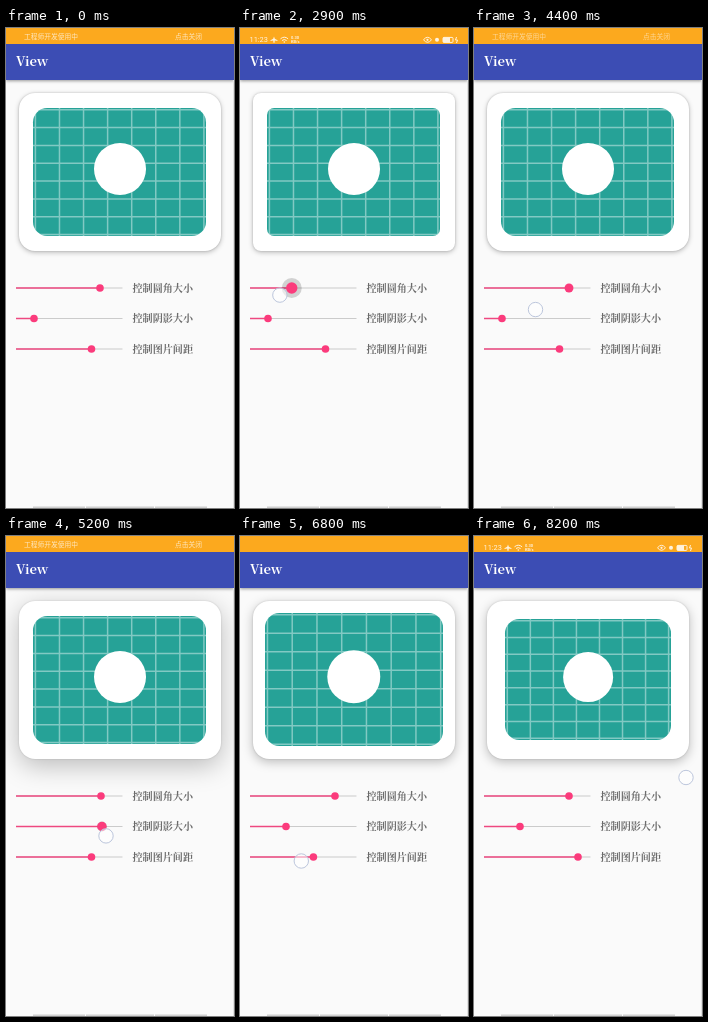
An HTML page that plays this animation: 228 by 480 pixels, repeating every 8.3 s.

```html
<!DOCTYPE html>
<html lang="zh">
<head>
<meta charset="utf-8">
<title>View</title>
<style>
html, body { margin: 0; width: 100%; height: 100%; overflow: hidden; background: #fafafa; }
div, svg { position: absolute; }
#stage { left: 0; top: 0; width: 228px; height: 480px; overflow: hidden; background: #fafafa; }
#status { left: 0; top: 0; width: 228px; height: 16px; background: #fca91e; }
#bar { left: 0; top: 16px; width: 228px; height: 36px; background: #3c4db4; box-shadow: 0 1px 3px rgba(0,0,0,.4); }
#card { left: 12.5px; top: 65px; width: 202.5px; height: 157.5px; background: #fff; }
#pic { overflow: hidden; background: #26a297; }
#pic svg { left: 0; top: 0; width: 100%; height: 100%; }
#dot { left: 50%; top: 47.7%; width: 30%; aspect-ratio: 1; border-radius: 50%; background: #fff; transform: translate(-50%, -50%); }
#edge { left: 227px; top: 52px; width: 1px; height: 428px; background: #e2e2e2; }
#ui { left: 0; top: 0; }
.title { font: 600 13px "Noto Serif CJK SC", "Noto Serif", serif; fill: #fff; }
.label { font: 600 10.1px "Noto Serif CJK SC", "Noto Sans CJK SC", "Noto Sans CJK", serif; fill: #6c6c6c; }
.note { font: 6.75px "Noto Sans CJK SC", "Noto Sans CJK", sans-serif; fill: #fff; fill-opacity: .72; }
.clock { font: 7.4px Roboto, sans-serif; fill: #fff; }
.speed { font: bold 4px Roboto, sans-serif; fill: #fff; }
.line { fill: none; stroke: #fff; stroke-width: 1; }
</style>
</head>
<body>
<div id="stage">
  <div id="card"><div id="pic">
    <svg viewBox="18 18 72 72" preserveAspectRatio="none"><path id="grid" fill="none" stroke="#fff" stroke-width="1.5" stroke-opacity=".42" vector-effect="non-scaling-stroke"/></svg>
    <div id="dot"></div>
  </div></div>
  <div id="bar"></div>
  <div id="status"></div>
  <div id="edge"></div>
  <svg id="ui" width="228" height="480" viewBox="0 0 228 480">
    <text class="title" x="10" y="38">View</text>
    <g id="note">
      <text class="note" x="18" y="11.2">工程师开发使用中</text>
      <text class="note" x="169" y="11.2">点击关闭</text>
    </g>
    <g id="icons">
      <text class="clock" x="9.5" y="14.4">11:23</text>
      <path fill="#fff" d="M34 8.5l.8 2.2 2.7 1.5v.8l-2.7-.6-.2 1.5.8.7h-2.8l.8-.7-.2-1.5-2.7.6v-.8l2.7-1.5z"/>
      <path class="line" d="M40.5 10.8q3.8-3.2 7.6 0M42 12.5q2.3-1.9 4.6 0"/>
      <circle cx="44.3" cy="14" r=".8" fill="#fff"/>
      <text class="speed" x="51" y="11.2">0.30</text>
      <text class="speed" x="51" y="14.8">KB/s</text>
      <path class="line" d="M183.5 11.8q4-5 8 0q-4 5-8 0z"/>
      <circle cx="187.5" cy="11.8" r="1.1" fill="#fff"/>
      <circle cx="197" cy="11.8" r="2" fill="#fff"/>
      <rect class="line" x="203" y="9.4" width="10" height="5" rx="1"/>
      <rect x="203" y="9.4" width="7" height="5" fill="#fff"/>
      <path class="line" d="M216.5 9l-1 3h2l-1 3"/>
    </g>
    <g id="sliders"></g>
    <path stroke="#d0d0d0" stroke-width="1.5" d="M27 479.2h52M80 479.2h68M149 479.2h52"/>
    <circle id="touch" r="7.2" fill="#fff" fill-opacity=".55" stroke="#bcc6dc"/>
  </svg>
</div>
<script>
const LOOP = 8300, STEP = 100, LAG = 100, LEFT = 10, RIGHT = 116.5;
const $ = id => document.getElementById(id);
const clamp = (v, lo, hi) => Math.min(hi, Math.max(lo, v));
const ramp = (t, from, to) => clamp((t - from) / (to - from), 0, 1);
const mix = (a, b, k) => a + (b - a) * k;

// finger: path of the pointer; the thumb follows it after LAG
const sliders = [
  { y: 260, text: '控制圆角大小', on: 1600, off: 4200, dip: 11,
    finger: t => 94 + 29 * ramp(t, 1500, 1800) - 95 * ramp(t, 2200, 3000) + 67 * ramp(t, 3000, 4070) },
  { y: 290.5, text: '控制阴影大小', on: 5000, off: 5900, dip: 10,
    finger: t => 28 + 72 * ramp(t, 4600, 5130) - 54 * ramp(t, 5200, 5800) },
  { y: 321, text: '控制图片间距', on: 6800, off: 7500, dip: 4,
    finger: t => 85.5 - 46 * ramp(t, 6600, 6980) + 64.5 * ramp(t, 7086, 7444) }
];

function set(el, attrs) {
  for (const k in attrs) el.setAttribute(k, attrs[k]);
}

function add(tag, attrs, text = '') {
  const el = document.createElementNS($('ui').namespaceURI, tag);
  set(el, attrs);
  el.textContent = text;
  $('sliders').append(el);
  return el;
}

let lines = '';
for (let u = 19; u < 90; u += 10) lines += `M${u} 18v72M18 ${u}h72`;
$('grid').setAttribute('d', lines);

for (const s of sliders) {
  add('path', { d: `M${LEFT} ${s.y}H${RIGHT}`, stroke: '#cbcbcb', 'stroke-width': 1.2 });
  s.track = add('path', { stroke: '#ee4880', 'stroke-width': 1.5 });
  s.halo = add('circle', { cy: s.y, fill: '#000', 'fill-opacity': .16 });
  s.thumb = add('circle', { cy: s.y, fill: '#fb3b7c' });
  add('text', { class: 'label', x: 126.5, y: s.y + 3.7 }, s.text);
}

function drawSlider(s, t) {
  const x = clamp(s.finger(t - LAG), LEFT, RIGHT);
  const press = ramp(t, s.on, s.on + 400) - ramp(t, s.off, s.off + 300);
  set(s.track, { d: `M${LEFT} ${s.y}H${x}` });
  set(s.halo, { cx: x, r: 10 * press });
  set(s.thumb, { cx: x, r: 3.8 + 1.9 * press });
  return x - LEFT;
}

function drawCard(corner, lift, gap) {
  const card = $('card').style, pic = $('pic').style;
  card.borderRadius = corner * .19 + 'px';
  card.boxShadow = `0 ${lift * .08}px ${lift * .3}px rgba(0,0,0,.25), 0 0 2px rgba(0,0,0,.18)`;
  pic.inset = gap * .2 - .5 + 'px';
  pic.borderRadius = corner * .17 + 'px';
}

function drawStatus(t) {
  const note = 1 - ramp(t, 0, 300) + ramp(t, 4100, 4500) - ramp(t, 6300, 6500);
  const icons = ramp(t, 700, 1200) - ramp(t, 3400, 3700) + ramp(t, 6900, 7300);
  $('note').setAttribute('opacity', note);
  $('icons').setAttribute('opacity', icons * .85);
}

// The pointer glides from one slider to the next, then returns at the loop's end
function drawTouch(t) {
  const [a, b, c] = sliders.map(s => ({
    x: s.finger(t), y: s.y + s.dip - Math.max(0, t - s.on) * .003
  }));
  const toB = ramp(t, 4200, 4600), toC = ramp(t, 6100, 6500);
  const along = k => mix(mix(a[k], b[k], toB), c[k], toC);
  const back = t >= 8200;
  set($('touch'), {
    cx: back ? 212 : along('x'),
    cy: back ? 241.5 : along('y'),
    visibility: back || (t >= 1600 && t < 7800) ? 'visible' : 'hidden'
  });
}

function draw(t) {
  drawCard(...sliders.map(s => drawSlider(s, t)));
  drawStatus(t);
  drawTouch(t);
}

const start = performance.now();
function tick() {
  const t = (performance.now() - start) % LOOP;
  draw(Math.floor(t / STEP) * STEP);
  requestAnimationFrame(tick);
}
draw(0);
requestAnimationFrame(tick);
</script>
</body>
</html>
```
